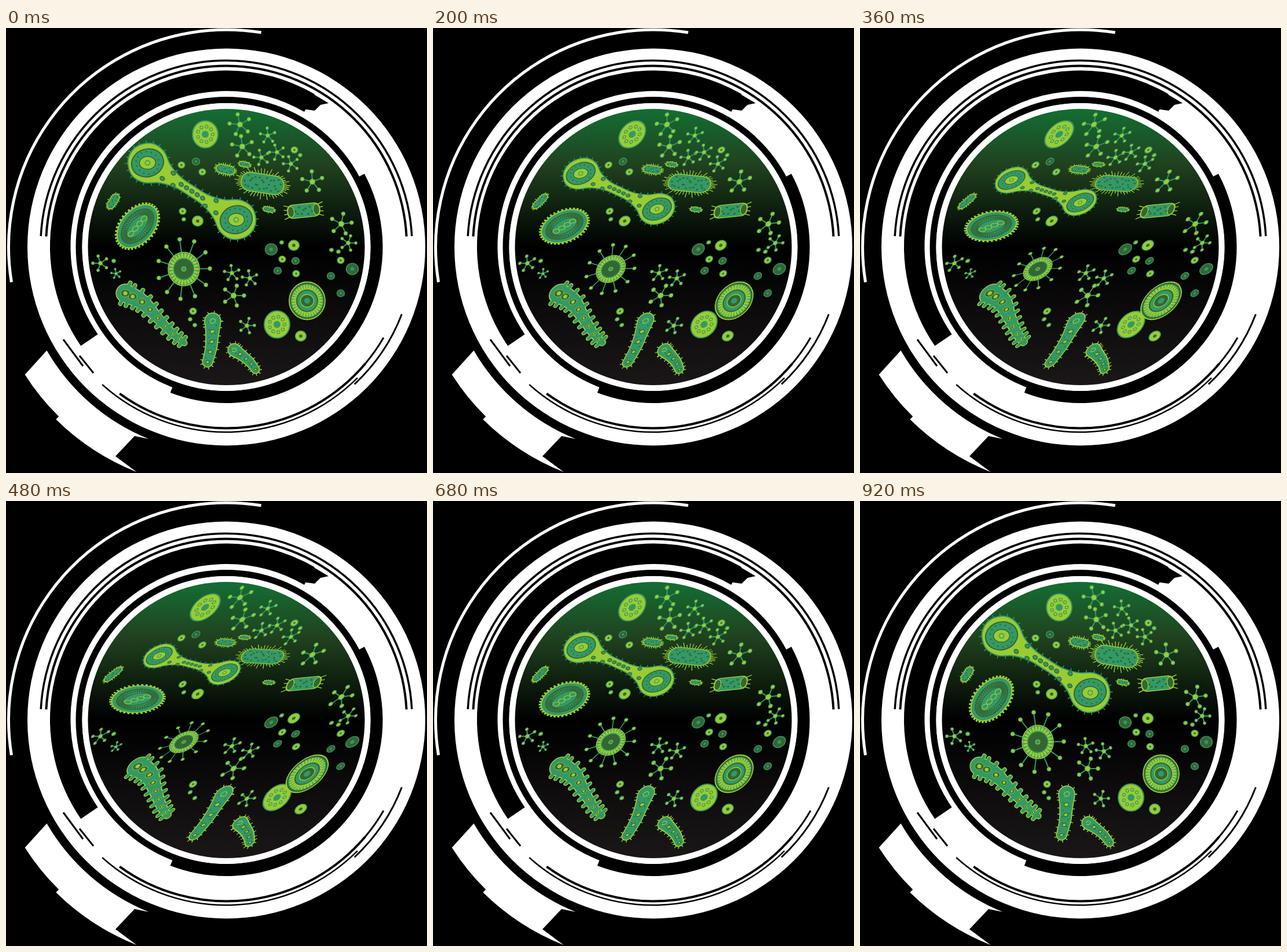
These frames come from a looping animation (727 by 770 pixels, 960 ms). An HTML page with a canvas:

```html
<!DOCTYPE html>
<html>
<head>
<meta charset="utf-8">
<title>Petri dish</title>
<style>
html, body { margin: 0; width: 100%; height: 100%; overflow: hidden; background: #000; }
canvas { display: block; }
</style>
</head>
<body>
<canvas id="stage" width="727" height="770"></canvas>
<script>
const ctx = document.getElementById('stage').getContext('2d');
const LIME = '#99cc33', TEAL = '#339966', DARK = '#336633';
const CX = 380.5, CY = 379, RAD = Math.PI / 180, TAU = Math.PI * 2;

// Fully bent poses as [xx, xy, yx, yy]
const SKEW = [1, -.577, 0, 1], SOFT = [1, -.42, -.03, .97], ROD = [1, -.25, -.06, .75];
let bend = 0;

// Eased rise, then a steady return
function bendAt(t) {
  const rise = 1 - Math.max(0, 1 - t / 480) ** 1.4;
  return Math.max(0, Math.min(rise, (920 - t) / 420));
}

// Draws around a local origin at x, y, deformed by the current bend
function bent(x, y, [xx, xy, yx, yy], draw) {
  ctx.save();
  ctx.translate(x, y);
  ctx.transform(1 + (xx - 1) * bend, yx * bend, xy * bend, 1 + (yy - 1) * bend, 0, 0);
  draw();
  ctx.restore();
}

function paint(fill, stroke, width = 1.5) {
  if (fill) { ctx.fillStyle = fill; ctx.fill(); }
  if (stroke) { ctx.strokeStyle = stroke; ctx.lineWidth = width; ctx.stroke(); }
}

function oval(x, y, rx, ry, fill, stroke, width, rot = 0) {
  ctx.beginPath();
  ctx.ellipse(x, y, rx, ry, rot * RAD, 0, TAU);
  paint(fill, stroke, width);
}

function line(x0, y0, x1, y1, color, width = 1.5) {
  ctx.beginPath();
  ctx.moveTo(x0, y0);
  ctx.lineTo(x1, y1);
  paint(null, color, width);
}

function polygon(points, fill, stroke, width) {
  ctx.beginPath();
  points.forEach(([x, y]) => ctx.lineTo(x, y));
  ctx.closePath();
  paint(fill, stroke, width);
}

// Annulus sector around the dish; lift moves its centre up
function band(r0, r1, from, to, color, lift = 0) {
  ctx.beginPath();
  ctx.arc(CX, CY - lift, (r0 + r1) / 2, from * RAD, to * RAD);
  paint(null, color, r1 - r0);
}

// Catmull-Rom samples; works for points of any dimension
function spline(points, closed) {
  const n = points.length, out = [], steps = 8;
  const at = i => closed ? points[(i + n) % n] : points[Math.max(0, Math.min(n - 1, i))];
  for (let i = 0; i < (closed ? n : n - 1); i++)
    for (let s = 0; s < steps; s++) {
      const u = s / steps, [a, b, c, d] = [-1, 0, 1, 2].map(o => at(i + o));
      out.push(b.map((v, j) => v + u / 2 * (c[j] - a[j] +
        u * (2 * a[j] - 5 * v + 4 * c[j] - d[j] + u * (3 * (v - c[j]) + d[j] - a[j])))));
    }
  if (!closed) out.push(points[n - 1]);
  return out;
}

// Radial strokes around an ellipse, from scale k0 to k1 plus a constant length
function rays(rx, ry, n, k0, k1, length, color, width, rough = 0) {
  for (let i = 0; i < n; i++) {
    const u = Math.cos(i / n * TAU), v = Math.sin(i / n * TAU);
    const l = length * (1 + rough * Math.sin(i * 2.7));
    line(rx * k0 * u, ry * k0 * v, (rx * k1 + l) * u, (ry * k1 + l) * v, color, width);
  }
}

// Evenly scattered dark specks inside a rounded bar
function specks(n, rx, ry, r) {
  for (let i = 0; i < n; i++)
    oval((i / (n - 1) - .5) * 1.7 * rx, Math.sin(i * 2.4) * ry * .65, r, r * .8, DARK);
}

function handle() {
  ctx.beginPath();
  ctx.arc(CX, CY, 358, 150 * RAD, 112 * RAD, true);
  ctx.lineTo(222, 706);
  ctx.lineTo(189, 741);
  ctx.arc(CX, CY, 419, 111.7 * RAD, 134.6 * RAD);
  ctx.arc(CX, CY, 412, 134.6 * RAD, 147.6 * RAD);
  paint('#fff');
}

function dish() {
  ctx.fillStyle = '#000';
  ctx.fillRect(0, 0, 727, 770);
  band(373.5, 378.5, 170.7, 279.2, '#fff');
  oval(CX, CY, 343.5, 343.5, '#fff');
  band(249, 260, 0, 360, '#000');
  band(249, 270, -28, 111, '#000');
  band(269, 304.5, 145.6, 300, '#000', 1);
  polygon([[505, 139], [533, 143], [543, 133], [557, 130], [520, 108]], '#000');
  band(319, 322.5, 183, 357, '#000', 2);
  band(309.5, 313.5, 183, 357, '#000', 2);
  band(311.5, 315.5, 40, 126, '#000');
  band(319, 321.5, 45, 132, '#000');
  band(323, 326, 21, 47, '#000');
  band(312, 315, 30, 40, '#000');
  line(99, 539, 133, 585, '#000', 3);
  line(127, 567, 151, 597, '#000', 3);
  handle();

  const glow = ctx.createLinearGradient(0, 140, 0, 618);
  glow.addColorStop(0, '#146e33');
  glow.addColorStop(.2, '#20421f');
  glow.addColorStop(.5, '#000');
  glow.addColorStop(1, '#1b1718');
  oval(CX, CY, 249, 249, '#fff');
  oval(CX, CY, 239, 239, glow);
}

// One quarter of the outline, mirrored into the whole
const quarter = [[28, 10], [55, 18], [78, 32], [101, 33], [119, 19]];
const flip = (points, sx, sy) => points.map(([x, y]) => [x * sx, y * sy]);
const dumbbellEdge = spline([[0, 9], ...quarter, [125, 0], ...flip(quarter, 1, -1).reverse(),
  [0, -9], ...flip(quarter, -1, -1), [-125, 0], ...flip(quarter, -1, 1).reverse()], true);

function dumbbell() {
  ctx.rotate(32.7 * RAD);
  dumbbellEdge.forEach(([x, y], i, all) => {
    if (i % 4) return;
    const [nx, ny] = all[(i + 1) % all.length], d = Math.hypot(nx - x, ny - y);
    line(x, y, x - (ny - y) / d * 5, y + (nx - x) / d * 5, TEAL);
  });
  polygon(dumbbellEdge, LIME, TEAL, 2);
  for (let i = -5; i <= 5; i++)
    oval(i * 11, Math.abs(i) > 2 ? (i % 2 ? 9 : -9) : 0, 4, 3.3, TEAL, DARK);
  for (const x of [-91, 91]) {
    oval(x, 0, 28, 24, TEAL, DARK, 2, -50);
    for (let a = 0; a < TAU; a += .45) oval(x + 20 * Math.cos(a), 19 * Math.sin(a), 1.3, 1.3, DARK);
    oval(x, 0, 14, 11, LIME, DARK, 1.5, -35);
    oval(x, 0, 4, 4, LIME, TEAL);
  }
}

function spinyOval() {
  ctx.rotate(-49 * RAD);
  rays(43, 28, 38, .96, 1, 4, LIME, 3.5);
  oval(0, 0, 43, 28, TEAL, LIME, 2);
  oval(0, 0, 35, 21, TEAL, DARK, 2);
  rays(34, 20, 46, .72, 1, 0, DARK, 2);
  oval(0, 0, 25, 12, TEAL, DARK);
  for (let i = -1.5; i < 2; i++) oval(i * 11.5, 0, 5.5, 4, TEAL, LIME, 1.3, 15);
}

function virus() {
  for (let i = 0; i < 11; i++) {
    const a = i * TAU / 11 - 1.73, x = 45 * Math.cos(a), y = 52 * Math.sin(a);
    line(0, 0, x, y, TEAL, 2);
    oval(x, y, 3.5, 3.5, LIME, TEAL, 1);
  }
  oval(0, 0, 27, 29, TEAL, LIME, 1.5);
  rays(27, 29, 26, .66, .94, 0, LIME, 4);
  oval(0, 0, 17.5, 18, DARK, TEAL);
  oval(0, 0, 4, 4, TEAL, LIME, 1);
}

// Calls draw(edgeX, edgeY, outX, outY) on both sides along a spine
function sides(samples, every, draw) {
  for (let i = 0; i < samples.length - 1; i += every) {
    const [x, y, w] = samples[i], [nx, ny] = samples[i + 1], d = Math.hypot(nx - x, ny - y);
    for (const s of [-1, 1]) {
      const ox = -(ny - y) / d * s, oy = (nx - x) / d * s;
      draw(x + ox * w, y + oy * w, ox, oy);
    }
  }
}

function tube(samples) {
  samples.forEach(([x, y, w]) => oval(x, y, w + .7, w + .7, LIME));
  samples.forEach(([x, y, w]) => oval(x, y, w - 1, w - 1, TEAL));
}

// Spines relative to their organism's centre: x, y, half width
const grubSpine = spline([[-51, -37, 16], [-22, -22, 13], [5, 6, 9], [31, 33, 7], [51, 49, 5]]);
const longWorm = spline([[3, -33, 14], [2, -8, 11], [0, 14, 10], [-6, 38, 9]]);
const shortWorm = spline([[-18, -17, 11], [-4, -7, 9], [9, 4, 8], [19, 17, 7]]);

function grub() {
  const lobes = (from, to, color, width) => sides(grubSpine, 3, (x, y, ox, oy) =>
    line(x + ox * from, y + oy * from, x + ox * to, y + oy * to, color, width));
  ctx.lineCap = 'round';
  lobes(-3, 4, LIME, 8);
  lobes(-3, 4, TEAL, 5);
  ctx.lineCap = 'butt';
  tube(grubSpine);
  lobes(-4, 3, TEAL, 5);
  for (let i = 0; i < grubSpine.length - 2; i += 4) {
    const [x, y, w] = grubSpine[i], r = Math.max(3.5, w * .5);
    oval(x, y, r, r * .8, DARK, LIME, .8);
    oval(x, y, r * .45, r * .45, LIME);
  }
}

function worm(samples) {
  const [hx, hy, hw] = samples[0], [tx, ty, tw] = samples[samples.length - 1];
  for (const [x, y, w] of [[hx, hy, hw], [tx, ty, tw]]) {
    ctx.save();
    ctx.translate(x, y);
    rays(w, w, 9, .2, 1, 4, LIME, 1.5);
    ctx.restore();
  }
  sides(samples, 4, (x, y, ox, oy) => line(x, y, x + ox * 4, y + oy * 4, LIME));
  tube(samples);
  samples.forEach(([x, y, w], i) => {
    if (i % 2) oval(x + (i % 4 - 2) * w * .5, y, 1, 1, DARK);
    if (i % 6 === 0) oval(x, y, w * .35, w * .28, i ? LIME : TEAL, i ? DARK : LIME, 1.3, -20);
  });
}

function rod(rx, ry, rot, hairs, length) {
  ctx.rotate(rot * RAD);
  rays(rx, ry, hairs, .8, 1, length, LIME, 1.4, .35);
  ctx.beginPath();
  ctx.roundRect(-rx, -ry, rx * 2, ry * 2, ry * .95);
  paint(TEAL, LIME, 1.5);
  specks(Math.round(rx * .7), rx, ry, Math.sqrt(rx) * .32);
}

function cylinder() {
  ctx.rotate(-6 * RAD);
  for (const side of [-1, 1])
    for (let i = -1.5; i < 2; i++)
      line(side * 24, i * 5.5, side * 34, i * 8, LIME);
  ctx.beginPath();
  ctx.roundRect(-28, -11.5, 56, 23, 9);
  paint(TEAL, LIME);
  specks(9, 17, 10, 2);
  for (const side of [-1, 1]) oval(side * 22, 0, 5.5, 9.5, DARK, LIME, 1.3);
}

function cell() {
  oval(0, 0, 22, 23.5, LIME, TEAL, 2);
  for (let a = 0; a < TAU - .1; a += TAU / 9)
    oval(13 * Math.cos(a), 13.5 * Math.sin(a), 2.6, 2.6, LIME, TEAL, 1.2);
  oval(0, 0, 6, 6, TEAL);
}

function stripedCell() {
  oval(0, 0, 31, 32.5, DARK, LIME, 1.8);
  oval(0, 0, 28, 29, TEAL);
  rays(28, 29, 32, .66, .96, 0, LIME, 3.6);
  oval(0, 0, 18, 18.5, TEAL, DARK, 2);
  oval(0, 0, 11.5, 11, DARK, LIME, 1.3);
  oval(0, 0, 5, 5, TEAL);
}

function molecule(r, rot) {
  for (let i = 0; i < 5; i++) {
    const a = (rot + i * 72) * RAD, x = (r - 2) * Math.cos(a), y = (r - 2) * Math.sin(a);
    line(0, 0, x, y, TEAL, 2);
    oval(x, y, r * .17, r * .17, LIME, TEAL, 1);
  }
  oval(0, 0, r * .24, r * .24, LIME, TEAL, 1);
}

function dot(r, color) {
  oval(0, 0, r, r * .94, color, TEAL, 1.4);
  if (r > 5) oval(0, 0, r * .3, r * .3, color === LIME ? DARK : TEAL);
}

// Calls draw at each spot in the shared soft pose
const scatter = (spots, draw) => spots.forEach(([x, y]) => bent(x, y, SOFT, () => draw(x, y)));

function smallLife() {
  const spin = (x, y) => -90 + 18 * Math.sin(x + y);
  scatter([[404, 167], [408, 205], [529, 266], [579, 339], [393, 463]], (x, y) => molecule(20, spin(x, y)));
  scatter([[452, 186], [441, 224], [468, 215], [492, 235], [591, 372], [163, 407], [390, 424], [421, 433], [416, 515]],
    (x, y) => molecule(15, spin(x, y)));
  scatter([[190, 425]], () => molecule(10, -100));
  scatter([[307, 331], [508, 220], [476, 371], [562, 384], [574, 387], [186, 403], [318, 504], [326, 514]], () => dot(3.3, LIME));
  scatter([[303, 237], [339, 249], [305, 317], [498, 211], [477, 400], [501, 425], [578, 402], [323, 490]], () => dot(6, LIME));
  scatter([[331, 334], [497, 376], [509, 533]], () => dot(9.5, LIME));
  scatter([[328, 231], [469, 420], [500, 403], [561, 429], [578, 459]], () => dot(6.5, DARK));
  scatter([[458, 383], [598, 417]], () => dot(10.5, DARK));
}

function render(now) {
  bend = bendAt(Math.floor(now % 960 / 40) * 40);
  dish();
  smallLife();
  bent(321, 282.5, [.8, -.1, -.18, .575], dumbbell);
  bent(344, 184, SKEW, cell);
  bent(468, 513, SOFT, cell);
  bent(520, 472, SKEW, stripedCell);
  bent(227, 343, [1.08, -.33, .355, .676], spinyOval);
  bent(307, 417, [.82, -.38, -.02, .65], virus);
  bent(185, 300, SKEW, () => rod(14, 6.5, -56, 26, 3));
  bent(379, 245, ROD, () => rod(16, 7.5, 12, 30, 4));
  bent(412, 236, ROD, () => rod(9.5, 4, 12, 20, 2.5));
  bent(454, 314, ROD, () => rod(9.5, 4, 12, 20, 2.5));
  bent(443, 269, ROD, () => rod(37, 16, 9, 48, 9));
  bent(514, 316, [1, -.45, 0, .94], cylinder);
  bent(257, 496, SKEW, grub);
  bent(354, 540, SKEW, () => worm(longWorm));
  bent(412, 574, SKEW, () => worm(shortWorm));
  requestAnimationFrame(render);
}
requestAnimationFrame(render);
</script>
</body>
</html>
```
